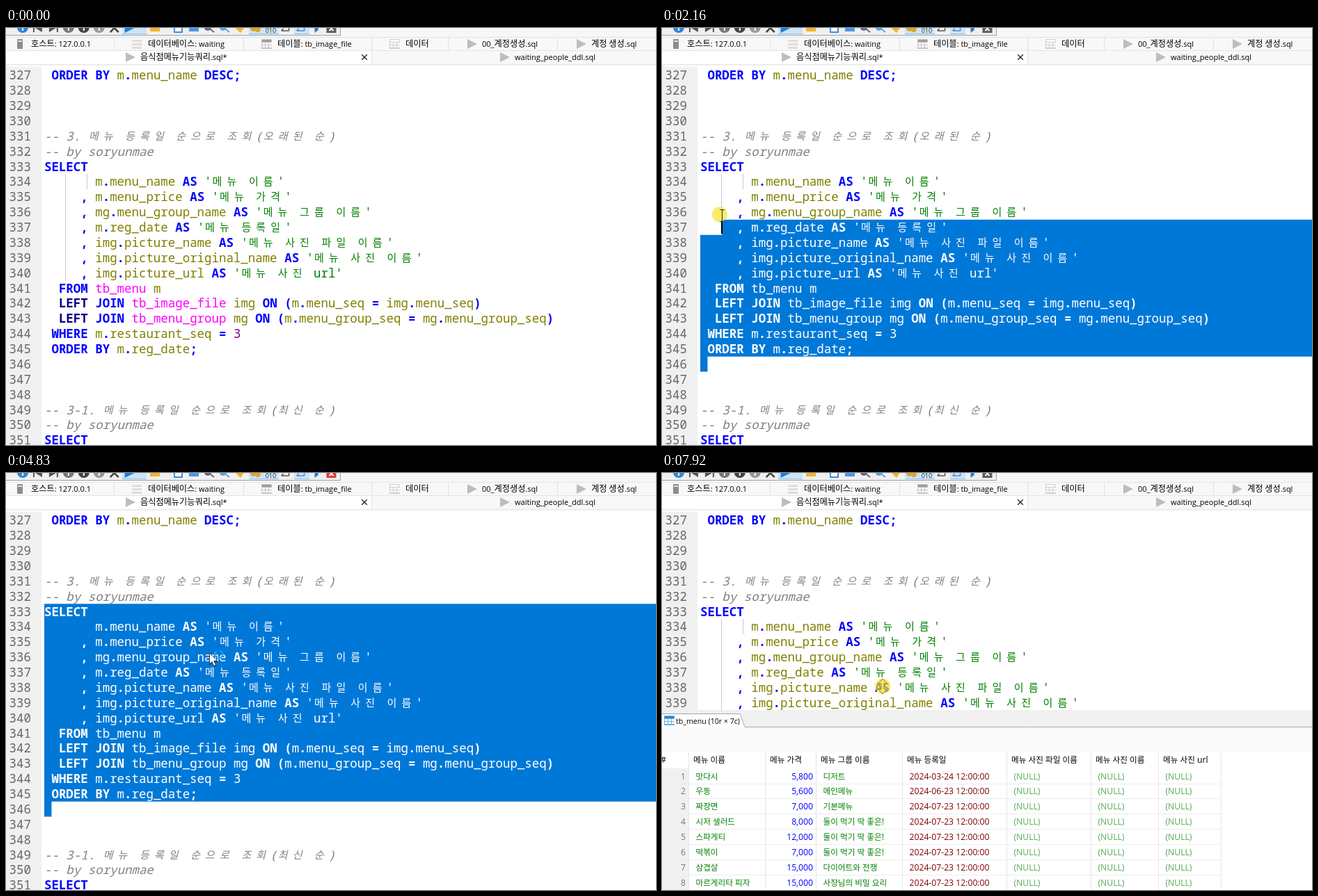
Recreate the animation shown at these times as an HTML page with a canvas. Size 934 px wide and 600 px high, loop 7990 ms.

```html
<!DOCTYPE html>
<html lang="ko">
<head>
<meta charset="utf-8">
<title>SQL editor</title>
<style>
html, body { margin: 0; width: 100%; height: 100%; overflow: hidden; background: #fff; }
canvas { display: block; }
</style>
</head>
<body>
<canvas id="stage" width="934" height="600"></canvas>
<script>
const ctx = document.getElementById('stage').getContext('2d');
const W = 934, H = 600, LOOP = 7990, STEP = 70;
const LEFT = 55, TOP = 57, ROW = 21.875, CELL = 10.46;
const FIRST = 327, ANCHOR = 19;
const CODE_SIZE = CELL / .6;
const MONO = '"Noto Sans Mono", "DejaVu Sans Mono", monospace';
const SANS = '"Open Sans", "Noto Sans", sans-serif';
const HANGUL = '"Noto Sans CJK KR", "Noto Sans CJK", sans-serif';
const isHangul = c => c >= '\uac00' && c <= '\ud7a3';

const CODE = ` ORDER BY m.menu_name DESC;



-- 3. 메뉴 등록일 순으로 조회(오래된 순)
-- by soryunmae
SELECT
       m.menu_name AS '메뉴 이름'
     , m.menu_price AS '메뉴 가격'
     , mg.menu_group_name AS '메뉴 그룹 이름'
     , m.reg_date AS '메뉴 등록일'
     , img.picture_name AS '메뉴 사진 파일 이름'
     , img.picture_original_name AS '메뉴 사진 이름'
     , img.picture_url AS '메뉴 사진 url'
  FROM tb_menu m
  LEFT JOIN tb_image_file img ON (m.menu_seq = img.menu_seq)
  LEFT JOIN tb_menu_group mg ON (m.menu_group_seq = mg.menu_group_seq)
 WHERE m.restaurant_seq = 3
 ORDER BY m.reg_date;
${' '}


-- 3-1. 메뉴 등록일 순으로 조회(최신 순)
-- by soryunmae
SELECT`.split('\n');

const cells = s => [...s].reduce((n, c) => n + (isHangul(c) ? 2 : 1), 0);
const KEYWORD = /^(SELECT|AS|FROM|JOIN|ON|WHERE|ORDER|BY|DESC)$/;

function style(tok) {
  if (tok.startsWith('--')) return ['#808080', 'italic '];
  if (tok[0] === "'") return ['#008000', ''];
  if (KEYWORD.test(tok)) return ['#0000ff', 'bold '];
  if (tok === 'LEFT') return ['#000080', 'bold '];
  if (/^tb_/.test(tok)) return ['#ff00ff', ''];
  if (/^\d/.test(tok)) return ['#800080', ''];
  if (/^\w/.test(tok)) return ['#808000', ''];
  return ['#0000ff', 'bold '];
}

const LINES = CODE.map(text => {
  let col = 0;
  const toks = text.match(/--.*|'[^']*'|\w+|\s+|./g) || [];
  return toks.map(tok => {
    const item = { tok, col, style: style(tok) };
    col += cells(tok);
    return item;
  });
});

function rect(x, y, w, h, color) {
  ctx.fillStyle = color;
  ctx.fillRect(x, y, w, h);
}

function shape(color, ...pts) {
  ctx.fillStyle = color;
  ctx.beginPath();
  for (let i = 0; i < pts.length; i += 2) ctx.lineTo(pts[i], pts[i + 1]);
  ctx.closePath();
  ctx.fill();
}

function line(color, width, ...pts) {
  ctx.strokeStyle = color;
  ctx.lineWidth = width;
  ctx.beginPath();
  for (let i = 0; i < pts.length; i += 4) {
    ctx.moveTo(pts[i], pts[i + 1]);
    ctx.lineTo(pts[i + 2], pts[i + 3]);
  }
  ctx.stroke();
}

const hline = (y, color, x0 = 0, x1 = W) => line(color, 1, x0, y + .5, x1, y + .5);
const vline = (x, color, y0, y1) => line(color, 1, x + .5, y0, x + .5, y1);

function cross(x, y, r, color, width) {
  line(color, width, x - r, y - r, x + r, y + r, x + r, y - r, x - r, y + r);
}

function disc(x, y, r, color) {
  ctx.fillStyle = color;
  ctx.beginPath();
  ctx.arc(x, y, r, 0, 7);
  ctx.fill();
}

// Latin and Hangul runs use separate font sizes.
function label(text, x, y, color = '#000', size = 11, koSize = 12.2) {
  ctx.fillStyle = color;
  for (const run of text.match(/[\uac00-\ud7a3]+|[^\uac00-\ud7a3]+/g)) {
    ctx.font = isHangul(run) ? `${koSize}px ${HANGUL}` : `${size}px ${SANS}`;
    ctx.fillText(run, x, y);
    x += ctx.measureText(run).width;
  }
}

const cell = (text, x, y, color) => label(text, x, y, color, 12.2, 11.6);

function rightCell(text, x, y, color) {
  ctx.textAlign = 'right';
  cell(text, x, y, color);
  ctx.textAlign = 'left';
}

const rowTop = row => TOP + row * ROW;

function drawCode(color) {
  LINES.forEach((toks, row) => {
    const y = rowTop(row) + 17.3;
    for (const { tok, col, style: [own, face] } of toks) {
      ctx.fillStyle = color || own;
      let c = col;
      for (const run of tok.match(/[\uac00-\ud7a3]|[^\uac00-\ud7a3]+/g)) {
        const ko = isHangul(run);
        ctx.font = face + (ko ? `15px ${HANGUL}` : `${CODE_SIZE}px ${MONO}`);
        ctx.fillText(run, LEFT + c * CELL + ko, y - ko);
        c += cells(run);
      }
    }
  });
}

function drawGuides(color) {
  ctx.setLineDash([1, 1]);
  vline(85, color, rowTop(7), rowTop(14));
  vline(116, color, rowTop(7), rowTop(8));
  ctx.setLineDash([]);
}

function drawSelection({ row, col }) {
  if (row >= ANCHOR) return;
  const x = LEFT + col * CELL, y = rowTop(row);
  ctx.save();
  ctx.beginPath();
  ctx.rect(x, y, W - x, ROW);
  ctx.rect(LEFT, y + ROW, W, (ANCHOR - row - 1) * ROW);
  ctx.rect(LEFT, rowTop(ANCHOR), CELL, ROW);
  ctx.clip();
  rect(0, 0, W, H, '#0078d7');
  drawGuides('#2a6cae');
  drawCode('#fff');
  ctx.restore();
}

function drawGutter() {
  rect(0, 56, 51, H, '#f0f0f0');
  ctx.font = `${CODE_SIZE}px ${MONO}`;
  ctx.fillStyle = '#666';
  CODE.forEach((_, row) => ctx.fillText(FIRST + row, 4.5, rowTop(row) + 17.3));
}

const ICON = {
  dot(x, c) { disc(x, -1, 8, c); rect(x - 1, 0, 2, 4, '#fff'); },
  back(x, c) { rect(x - 7, 0, 2, 6, c); shape(c, x - 4, 0, x + 6, 0, x + 6, 6); },
  next(x, c) { rect(x + 5, 0, 2, 6, c); shape(c, x - 6, 0, x + 4, 0, x - 6, 6); },
  cross(x, c) { cross(x, 0, 6, c, 2.5); },
  play(x, c) { shape(c, x - 7, 0, x + 7, 0, x - 7, 7); },
  folder(x, c) { rect(x - 7, 0, 14, 5, c); },
  page(x, c) { rect(x - 7, 0, 13, 7, c); rect(x - 5, 0, 9, 5, '#fff'); },
  lens(x, c) { disc(x - 2, -1, 5, c); line(c, 2, x + 1, 1, x + 7, 6); },
  brush(x, c) { shape(c, x - 6, 0, x + 6, 0, x + 1, 7); },
  gear(x, c) { disc(x - 2, 0, 5, c); disc(x + 4, 2, 4, c); },
  bits(x, c) { label('010', x - 7, 7, c, 9); },
  turn(x, c) { line(c, 1.5, x - 6, 4, x + 5, 4, x + 5, 4, x + 5, 0, x - 6, 4, x - 3, 1); },
  comma(x, c) { shape(c, x - 2, 0, x + 3, 0, x + 3, 3, x - 2, 7); },
  stop(x, c) { rect(x - 7, -5, 14, 12, c); cross(x, 1, 3, '#fff', 2); }
};

function iconRow(x, icons) {
  icons.split(' ').forEach((icon, i) => {
    const [kind, color] = icon.split('#');
    ICON[kind](x + i * 21.95, '#' + color);
  });
}

function drawToolbar(busy) {
  rect(0, 0, W, 14, '#f7f7f7');
  rect(0, 0, 480, 10, '#f0f0f0');
  hline(10, '#a0a0a0', 0, 481);
  vline(480, '#a0a0a0', 0, 10);
  for (const [x, w] of [[167, 35], [349, 43], [414, 22]]) {
    rect(x, 0, w, 8, '#cce4f7');
    hline(8, '#8ebfe6', x, x + w);
  }
  iconRow(24, 'dot#2f86dc back#555 next#555 dot#777 dot#444 dot#999 cross#444 play#1683e0');
  iconRow(214, 'folder#f3b72e');
  iconRow(248, 'page#3f8cdb folder#4a9ae4 lens#668 lens#5ba3e4 brush#f0b32d gear#e0a52d ' +
    'bits#333 turn#555 turn#3f8cdb comma#1d7fd6 stop#' + (busy ? 'e33b32' : '5c5c5c'));
}

const TAB_ICON = {
  server(x, y) {
    rect(x - 4, y - 7, 8, 14, '#8c8c8c');
    rect(x - 3, y - 5, 6, 2, '#ddd');
  },
  stack(x, y) {
    for (let i = -1; i < 2; i++) rect(x - 7, y + i * 5 - 1, 14, 3, '#dedede');
  },
  grid(x, y, color = '#d0d0d0', head = '#fafafa') {
    rect(x - 7, y - 7, 15, 14, color);
    rect(x - 6, y - 6, 13, 3, head);
    for (let i = 0; i < 6; i++) {
      rect(x - 6 + i % 3 * 5, y - 2 + (i > 2) * 4, 4, 3, '#fafafa');
    }
  },
  table(x, y) { TAB_ICON.grid(x, y, '#c4c4c4', '#9c9c9c'); },
  play(x, y) { shape('#bdbdbd', x - 5, y - 7, x + 9, y, x - 5, y + 7); }
};

const TABS = [
  [-13, 23, 'server', '호스트: 127.0.0.1'],
  [155, 23, 'stack', '데이터베이스: waiting'],
  [341, 23, 'table', '테이블: tb_image_file'],
  [525, 23, 'grid', '데이터'],
  [635, 23, 'play', '00_계정생성.sql'],
  [792, 23, 'play', '계정 생성.sql'],
  [144, 42, 'play', '음식점메뉴기능쿼리.sql*'],
  [682, 42, 'play', 'waiting_people_ddl.sql']
];

function drawTabs() {
  rect(0, 14, W, 41, '#f8f8f8');
  rect(0, 33, 525, 20, '#fff');
  for (const y of [13, 32, 52]) hline(y, '#e4e4e4');
  vline(525, '#e0e0e0', 33, 52);
  for (const [x, y, icon, text] of TABS) {
    if (y < 33) vline(x, '#e0e0e0', 14, 32);
    TAB_ICON[icon](x + 33, y);
    label(text, x + 49, y + 4);
  }
  cross(515, 42, 3.8, '#222', 1.3);
}

const EDGES = [38, 148, 221, 345, 495, 616, 713, 803];
const HEADS = ['메뉴 이름', '메뉴 가격', '메뉴 그룹 이름', '메뉴 등록일', '메뉴 사진 파일 이름', '메뉴 사진 이름', '메뉴 사진 url'];
const MENU = [
  ['맛다시', '5,800', '디저트', '03-24'],
  ['우동', '5,600', '메인메뉴', '06-23'],
  ['짜장면', '7,000', '기본메뉴', '07-23'],
  ['시저 샐러드', '8,000', '둘이 먹기 딱 좋은!', '07-23'],
  ['스파게티', '12,000', '둘이 먹기 딱 좋은!', '07-23'],
  ['떡볶이', '7,000', '둘이 먹기 딱 좋은!', '07-23'],
  ['삼겹살', '15,000', '다이어트와 전쟁', '07-23'],
  ['마르게리타 피자', '15,000', '사장님의 비밀 요리', '07-23']
];

function drawResults(top) {
  ctx.save();
  ctx.translate(0, Math.round(top));
  rect(0, 0, W, H, '#fff');
  rect(0, 0, W, 25, '#f0f0f0');
  shape('#fff', 0, 6, 113, 6, 119, 26, 0, 26);
  hline(5, '#a8a8a8', 0, 112);
  hline(24, '#a8a8a8', 119);
  line('#a8a8a8', 1, 112, 5.5, 119, 24.5);
  rect(0, 26, W, 34, '#fafafa');
  TAB_ICON.grid(10, 15, '#6db1e6', '#2f86cf');
  label('tb_menu (10r × 7c)', 20, 20, '#000', 10.6);

  rect(0, 84, 38, H, '#f0f0f0');
  cell('#', -2, 76);
  HEADS.forEach((head, i) => cell(head, EDGES[i] + 7, 76));
  for (const x of EDGES) vline(x, '#e6e6e6', 61, H);
  MENU.forEach(([name, price, group, day], i) => {
    const y = 99.5 + i * ROW;
    const cols = [[name, '#008000'], null, [group, '#008000'], [`2024-${day} 12:00:00`, '#800000']];
    hline(Math.round(y + 6), '#ececec', 38, 804);
    rightCell(String(i + 1), 34, y, '#777');
    rightCell(price, EDGES[2] - 4, y, '#0000ff');
    HEADS.forEach((_, c) => {
      if (c === 1) return;
      const [text, color] = cols[c] || ['(NULL)', '#55aa55'];
      cell(text, EDGES[c] + 10.5, y, color);
    });
  });
  ctx.restore();
}

// Each move starts where the previous one ended; bend is a curve's control point.
const ENTRY = [850, 590];
const MOVES = [
  { start: 70, end: 730, to: [329, 481], bend: [40, 335] },
  { start: 1180, end: 1740, to: [150, 322], bend: [235, 436] },
  { start: 1880, end: 2630, to: [77, 231], bend: [38, 244] },
  { start: 2700, end: 3170, to: [47, 197], bend: [50, 200] },
  { start: 3700, end: 3970, to: [291, 259] },
  { start: 5490, end: 5830, to: [418, 408] },
  { start: 6040, end: 6390, to: [379, 575] },
  { start: 7600, end: 7920, to: [317, 307] }
];

function pointer(t) {
  const i = MOVES.findLastIndex(m => t >= m.start);
  if (i < 0) return null;
  const { start, end, to, bend } = MOVES[i];
  const from = i ? MOVES[i - 1].to : ENTRY;
  const gaps = Math.round((end - start) / STEP);
  const s = Math.min(1, Math.floor((t - start) / (end - start) * gaps + 1.2) / (gaps + 1));
  const [x, y] = from.map((a, k) => {
    const c = bend ? bend[k] : (a + to[k]) / 2;
    return (1 - s) ** 2 * a + 2 * s * (1 - s) * c + s * s * to[k];
  });
  return { x, y };
}

const PRESS = 1030, RELEASE = 3170, CLICK = 5830, BLINK = 530;

// The selection follows the pointer one step late.
function caret(t) {
  if (t >= CLICK) return { row: 16, col: 35 };
  if (t < 1250) return { row: ANCHOR, col: 1 };
  const { x, y } = pointer(Math.min(t, RELEASE + STEP) - STEP);
  const row = Math.floor((y + 2 - TOP) / ROW);
  const col = Math.floor((x + 3 - LEFT) / CELL);
  return { row, col: Math.max(0, Math.min(col, cells(CODE[row]))) };
}

function caretOn(t) {
  const idle = t - (t < CLICK ? RELEASE : CLICK + 250);
  return t >= PRESS && (idle < 0 || Math.floor(idle / BLINK) % 2 === 0);
}

function busyArrow(t) {
  shape('#333', -1, -2, -1, 17, 3, 13, 6, 19, 9, 17, 7, 12, 12, 12);
  shape('#fff', 0, 0, 0, 14, 3, 11, 6, 17, 8, 16, 5, 10, 10, 10);
  ctx.strokeStyle = '#2ba0ee';
  ctx.lineWidth = 2;
  ctx.beginPath();
  ctx.arc(12.5, 1, 5.5, t / 160, t / 160 + 5.4);
  ctx.stroke();
}

function resizeArrow() {
  shape('#f6ea70', 0, -11, 6, -4, 2, -4, 2, 4, 6, 4, 0, 11, -6, 4, -2, 4, -2, -4, -6, -4);
  ctx.strokeStyle = '#8a7d20';
  ctx.lineWidth = 1;
  ctx.stroke();
}

function beam() {
  line('#333', 1, 0, -8, 0, 8, -3.5, -8.5, 3.5, -8.5, -3.5, 8.5, 3.5, 8.5);
}

function drawPointer(t, busy) {
  const at = pointer(t);
  if (!at) return;
  if (t < 3560 || t >= 5490) disc(at.x, at.y, 11, 'rgba(248, 226, 40, .7)');
  ctx.save();
  ctx.translate(Math.round(at.x), Math.round(at.y));
  if (busy) {
    ctx.translate(2, 1);
    busyArrow(t);
  } else if (t >= 6390) {
    resizeArrow();
  } else {
    ctx.translate(3.5, 2);
    beam();
  }
  ctx.restore();
}

function draw(t) {
  const busy = t >= 4830 && t < 5030;
  const head = caret(t);
  rect(0, 0, W, H, '#fff');
  drawToolbar(busy);
  drawTabs();
  drawGutter();
  drawGuides('#909090');
  drawCode();
  if (t >= 1180 && t < CLICK) drawSelection(head);
  if (caretOn(t)) {
    rect(Math.round(LEFT + head.col * CELL) - 1, Math.round(rowTop(head.row)), 2, 20, '#000');
  }
  if (t >= 7600) drawResults(pointer(t).y + 34);
  drawPointer(t, busy);
}

function tick() {
  draw(performance.now() % LOOP);
  requestAnimationFrame(tick);
}
tick();
</script>
</body>
</html>
```
